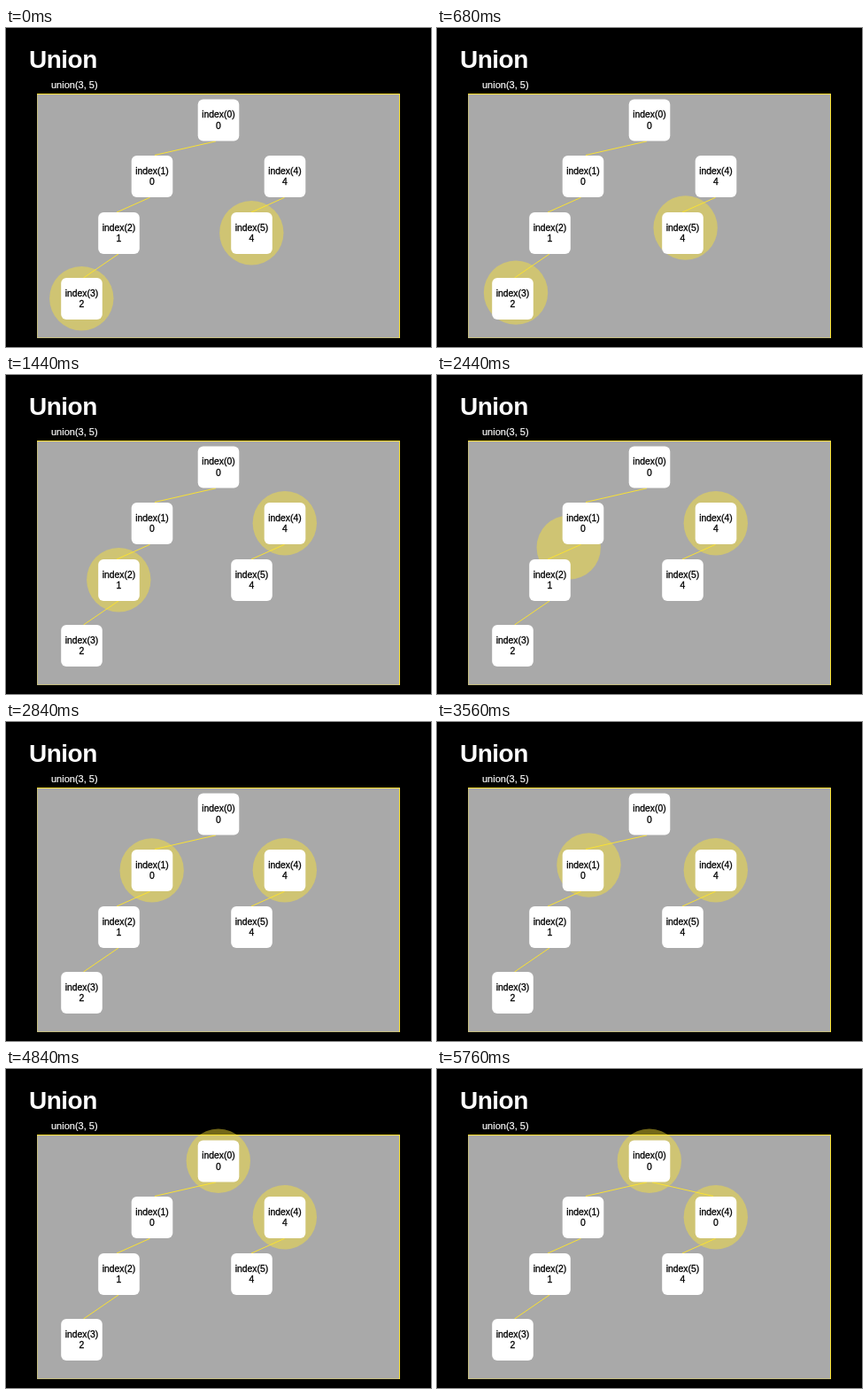
Recreate the animation shown at these times as an HTML page. Size 480 by 360 pixels, loop 6.28 s.

```html
<!DOCTYPE html>
<html lang="en">
<head>
<meta charset="utf-8">
<title>Union</title>
<style>
  html, body { margin: 0; width: 100%; height: 100%; overflow: hidden; background: #000; }
  svg { display: block; width: 480px; height: 360px; font-family: "Liberation Sans", Arial, sans-serif; }
  .title { font-size: 28px; font-weight: bold; letter-spacing: -.5px; fill: #fff; }
  .call { font-size: 11px; fill: #fff; stroke: #fff; stroke-width: .2; }
  .panel { fill: #a9a9a9; }
  .edge { fill: none; stroke: #fae232; }
  .faint { stroke-opacity: .35; }
  .halo { fill: #fae232; fill-opacity: .46; }
  .node { fill: #fff; }
  .label { font-size: 10.4px; text-anchor: middle; stroke: #000; stroke-width: .3; }
</style>
</head>
<body>
<svg viewBox="0 0 480 360">
  <rect width="480" height="360"/>
  <text class="title" x="26" y="45">Union</text>
  <text class="call" x="51" y="68">union(3, 5)</text>
  <rect class="panel" x="35" y="74" width="410" height="276"/>
  <path class="edge faint" d="M35.5 75V349.5H444"/>
  <path class="edge" d="M35 74.5H444.5V350"/>
  <circle class="halo" id="left" r="36.2"/>
  <circle class="halo" id="right" r="36.2"/>
  <path class="edge" d="M237 127.8L168 143.5M162.5 191.3L125 208M127 255L87.5 282M314.5 191.3L277 208"/>
  <path class="edge" id="link" d="M243 127.8L312 143.5"/>
  <g id="nodes"></g>
</svg>
<script>
  const LOOP = 6280, STEP = 40, MOVE = 960;
  const STARTS = [480, 1920, 3360, 4800];
  const SPOTS = [[240, 104], [165, 167.5], [127.5, 231.5], [85.5, 305.5], [315, 167.5], [277.5, 231.5]];
  const PARENTS = [0, 0, 1, 2, 4, 4];
  const get = id => document.getElementById(id);

  function add(tag, attrs, text = '') {
    const el = document.createElementNS('http://www.w3.org/2000/svg', tag);
    for (const key in attrs) el.setAttribute(key, attrs[key]);
    el.textContent = text;
    return get('nodes').appendChild(el);
  }

  const label = (x, y, text) => add('text', { class: 'label', x, y }, text);

  const digits = SPOTS.map(([x, y], i) => {
    add('rect', { class: 'node', x: x - 23.3, y: y - 23.4, width: 46.6, height: 46.8, rx: 6 });
    label(x, y - 2.8, `index(${i})`);
    return label(x, y + 9.8, PARENTS[i]);
  });
  const oldRoot = digits[4];
  const newRoot = label(315, 177.3, '0');

  // cubic-bezier(.42, 0, .58, 1), solved by bisection
  function ease(p) {
    if (p <= 0 || p >= 1) return p;
    let lo = 0, hi = 1, s;
    for (let i = 0; i < 24; i++) {
      s = (lo + hi) / 2;
      const x = 3 * s * (1 - s) * (.42 * (1 - s) + .58 * s) + s ** 3;
      if (x < p) lo = s; else hi = s;
    }
    return s * s * (3 - 2 * s);
  }

  function follow(id, route, phases) {
    let [x, y] = SPOTS[route[0]];
    for (let i = 1; i < route.length; i++) {
      const p = ease(phases[i - 1]);
      const [ax, ay] = SPOTS[route[i - 1]], [bx, by] = SPOTS[route[i]];
      x += (bx - ax) * p;
      y += (by - ay) * p;
    }
    get(id).setAttribute('transform', `translate(${x - .2} ${y - .3})`);
  }

  function draw(ms) {
    const t = Math.floor(((ms + 6) % LOOP) / STEP) * STEP;
    const phases = STARTS.map(s => Math.min(1, Math.max(0, (t - s) / MOVE)));
    follow('left', [3, 2, 1, 0], phases);
    follow('right', [5, 4], phases);
    const fade = phases[3];
    oldRoot.setAttribute('opacity', 1 - fade);
    newRoot.setAttribute('opacity', fade);
    get('link').setAttribute('opacity', fade < 1 ? 0 : 1);
  }

  const start = performance.now();
  function tick() {
    draw(performance.now() - start);
    requestAnimationFrame(tick);
  }
  tick();
</script>
</body>
</html>
```
